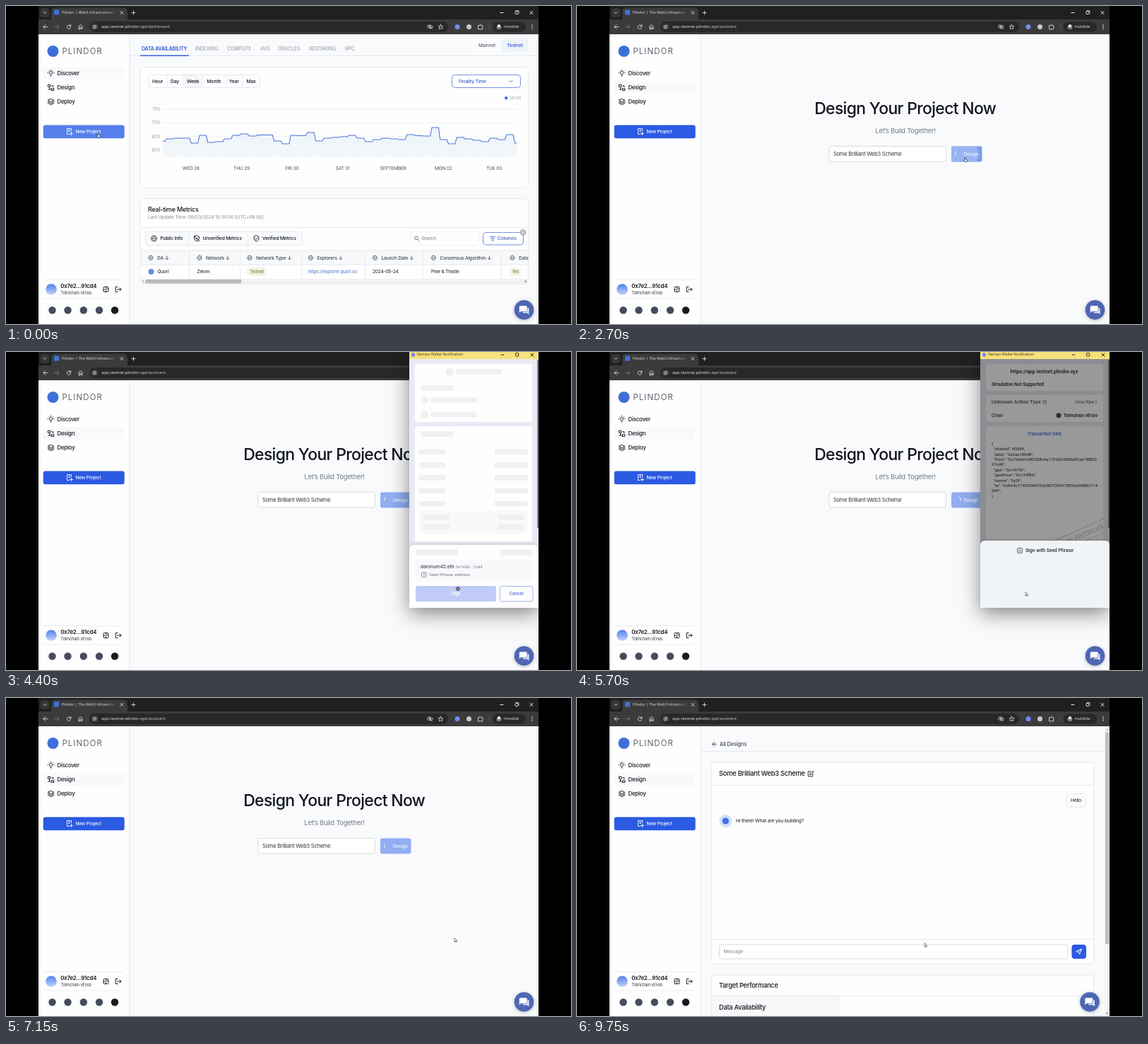
Recreate the animation shown at these times as an HTML page with a canvas. Size 800x450 px, loop 9800 ms.

```html
<!DOCTYPE html>
<html lang="en">
<head>
<meta charset="utf-8">
<title>Project design walkthrough</title>
<style>
html, body { margin: 0; width: 100%; height: 100%; overflow: hidden; background: #000; }
canvas { display: block; width: 800px; height: 450px; }
</style>
</head>
<body>
<canvas id="stage" width="800" height="450"></canvas>
<script>
const c = document.getElementById('stage').getContext('2d');
const LOOP = 9800;
const BLUE = '#2b5ae3', HOVER = '#557fea', INK = '#15181f', GREY = '#777c86', LINE = '#e4e8ee', PAGE = '#f8fafc';
const AT = { assistant: 500, leave: 1130, click: 2550, popup: 2950, loaded: 4700, sign: 5500, created: 5900, closed: 6700, chat: 7250 };
const PROJECT = 'Some Brilliant Web3 Scheme';
const HOST = 'app.testnet.plindor.xyz';

function text(s, x, y, size, color, { w = 400, f = 'Inter', a = 'left', ls } = {}) {
  c.font = `${w} ${size}px "${f}", sans-serif`;
  c.letterSpacing = (ls ?? (f === 'Inter' ? -0.03 * size : 0)) + 'px';
  c.textAlign = a;
  c.textBaseline = 'middle';
  c.fillStyle = color;
  c.fillText(s, x, y);
}
const ui = (s, x, y, size, color, opt) => text(s, x, y, size, color, { f: 'Open Sans', ...opt });
const rob = (s, x, y, size, color, opt) => text(s, x, y, size, color, { f: 'Roboto', ...opt });

function rect(x, y, w, h, fill, r = 0, stroke, lw = 1) {
  c.beginPath();
  c.roundRect(x, y, w, h, r);
  if (fill) { c.fillStyle = fill; c.fill(); }
  if (stroke) { c.strokeStyle = stroke; c.lineWidth = lw; c.stroke(); }
}
function disc(x, y, r, fill, stroke, lw = 1) {
  c.beginPath();
  c.arc(x, y, r, 0, 7);
  if (fill) { c.fillStyle = fill; c.fill(); }
  if (stroke) { c.strokeStyle = stroke; c.lineWidth = lw; c.stroke(); }
}
function icon(d, x, y, color, lw = 1, fill) {
  const p = new Path2D(d);
  c.save();
  c.translate(x, y);
  c.lineCap = c.lineJoin = 'round';
  if (fill) { c.fillStyle = fill; c.fill(p); }
  if (color) { c.strokeStyle = color; c.lineWidth = lw; c.stroke(p); }
  c.restore();
}
const hline = (x1, x2, y, color = LINE) => rect(x1, y, x2 - x1, 1, color);
const vline = (x, y1, y2, color = LINE) => rect(x, y1, 1, y2 - y1, color);
function clip(x, y, w, h, draw) {
  c.save();
  c.beginPath();
  c.rect(x, y, w, h);
  c.clip();
  draw();
  c.restore();
}
function shadowed(color, blur, dy, draw) {
  c.save();
  c.shadowColor = color;
  c.shadowBlur = blur;
  c.shadowOffsetY = dy;
  draw();
  c.restore();
}
const clamp = v => Math.max(0, Math.min(1, v));
function mix(a, b, k) {
  const ch = (s, i) => parseInt(s.slice(i, i + 2), 16);
  return `rgb(${[1, 3, 5].map(i => Math.round(ch(a, i) + (ch(b, i) - ch(a, i)) * k))})`;
}

const CROSS = 'M-2-2L2 2M2-2L-2 2';
const BACK = 'M3 0H-3M0-3L-3 0L0 3';
const DOWN = 'M0-2.5V2.5M-2 .5L0 2.5L2 .5';
const CHEVRON = 'M-2-1L0 1L2-1';
const DOC = 'M3-1V-4H-3V4H0M-1-2H1M-1 0H1M3 1V5M1 3H5';
const SHIELD = 'M0-4L3.5-2.5V0Q3 3 0 4Q-3 3-3.5 0V-2.5ZM-1.5 0L-.3 1.2L1.7-1';

function globe(x, y, r, color) {
  disc(x, y, r, null, color, .7);
  icon(`M${-r} 0H${r}M0 ${-r}Q${-r} 0 0 ${r}Q${r} 0 0 ${-r}`, x, y, color, .6);
}

function chrome(path, title) {
  rect(46, 0, 708, 20, '#1f2020');
  rect(46, 19, 708, 21, '#3b3b3b');
  rect(48.5, 3, 13, 13, '#353636', 4);
  icon(CHEVRON, 55, 9.5, '#ddd', .9);
  rect(64, 2.5, 108, 20, '#3b3b3b', 5);
  rect(68, 5.5, 7, 7, '#3f72d8');
  clip(79, 0, 76, 19, () => ui(title, 79, 9.5, 5.3, '#e2e2e2'));
  const fade = c.createLinearGradient(144, 0, 156, 0);
  fade.addColorStop(0, '#3b3b3b00');
  fade.addColorStop(1, '#3b3b3b');
  rect(144, 4, 12, 12, fade);
  icon(CROSS, 164, 9.5, '#ddd', .9);
  icon('M-2.5 0H2.5M0-2.5V2.5', 180.5, 9.5, '#ddd', .9);
  icon('M-2 0H2', 702, 9.5, '#eee');
  rect(721, 7.5, 4, 4, null, 1, '#eee', .9);
  icon('M-1-2H3V2', 723, 8.5, '#eee', .7);
  icon(CROSS, 744, 9.5, '#eee');

  icon(BACK, 56, 29.5, '#ddd', .9);
  c.save(); c.translate(72, 29.5); c.scale(-1, 1); icon(BACK, 0, 0, '#777', .9); c.restore();
  icon('M2.5-1A2.7 2.7 0 1 0 2.6 1M2.8-3V-.8H.7', 89, 29.5, '#ddd', .9);
  icon('M-2.5 3V-.8L0-3L2.5-.8V3H.8V.7H-.8V3Z', 105.5, 29.5, '#ddd', .9);
  rect(118, 22, 508, 15, '#282828', 7.5);
  disc(125.5, 29.5, 5, '#3c3c3c');
  icon('M-2.6-1.3H-.2M1.8-1.3H2.6M-2.6 1.3H-1.8M.2 1.3H2.6', 125.5, 29.5, '#ddd', .8);
  disc(126.3, 28.2, .9, null, '#ddd', .7);
  disc(124.7, 30.8, .9, null, '#ddd', .7);
  ui(HOST, 135, 29.3, 6, '#eeeeee');
  ui(path, 135 + c.measureText(HOST).width, 29.3, 6, '#cfcfcf');
  icon('M-4 0Q0-5 4 0Q0 5-4 0M-3-3L3 3', 600.5, 29.5, '#ddd', .9);
  disc(600.5, 29.5, 1.2, '#ddd');
  icon('M0-3.4L1-1L3.5-.8L1.6.8L2.2 3.2L0 1.9L-2.2 3.2L-1.6.8L-3.5-.8L-1-1Z', 615.5, 29.5, '#ddd', .8);
  disc(639, 29.5, 3.5, '#6f8df0');
  disc(655.5, 29.5, 3.5, '#c9c9c9');
  icon('M-3-2H-1A1 1 0 1 1 1-2H2.5V0A1 1 0 1 1 2.5 2V3.3H-3Z', 672, 29.5, '#ddd', .9);
  vline(684, 26, 33, '#5b5b5b');
  rect(689, 22.5, 47, 14, '#282828', 7);
  icon('M-3.2 0H3.2M-2-.5L-1.3-3H1.3L2-.5Z', 698, 29.5, '#eee', .7, '#eee');
  disc(696.5, 31.5, 1.1, null, '#eee', .7);
  disc(699.5, 31.5, 1.1, null, '#eee', .7);
  ui('Invisible', 705, 29.5, 5.6, '#f0f0f0');
  for (const y of [27, 29.5, 32]) disc(745, y, .8, '#eee');
}

function sidebar(selected, buttonColor) {
  rect(46, 40, 129, 410, '#fefefe');
  vline(174.5, 40, 450, '#e2e6ec');
  disc(66.5, 64, 8, '#3e6fd9');
  text('PLINDOR', 79.5, 64.5, 11.3, '#303640', { w: 300, ls: 1.2 });
  rect(53, 86 + selected * 20.3, 114, 18, '#f7f9fb', 3);
  ['Discover', 'Design', 'Deploy'].forEach((s, i) => text(s, 72.5, 95.2 + i * 20.3, 7.9, INK, { w: 500 }));
  disc(63.5, 94.5, 2.2, null, INK, .9);
  icon('M-1 4H1M0-4.5V-4M-4.5 0H-4M4 0H4.5M-3-3L-2.7-2.7M3-3L2.7-2.7', 63.5, 94.7, INK, .9);
  icon('M-4-4H-1V-1H-4ZM1 1.5H4V4.2H1ZM-4 3.5L-2 1.5M1-2.5H3V-.5M-.5 2.8H-2.2V0', 63.8, 115.3, INK, 1);
  icon('M0-4L4.2-2L0 0L-4.2-2ZM-4.2 0L0 2.1L4.2 0M-4.2 2L0 4.2L4.2 2', 63.7, 135.5, INK, 1);
  rect(52.7, 168.6, 115, 18.7, buttonColor, 3);
  icon(DOC, 89.5, 177.5, '#fff', .9);
  text('New Project', 98.5, 178.2, 6.6, '#fff', { w: 500 });

  hline(53, 167, 387, '#eaedf1');
  const ball = c.createLinearGradient(0, 393, 0, 409);
  ball.addColorStop(0, '#4f80ec');
  ball.addColorStop(1, '#c3d5fa');
  disc(64, 401, 7.8, ball);
  text('0x7e2...91cd4', 77.3, 396.8, 7.9, INK, { w: 600 });
  text('Tolmchain vErsio', 77.3, 406.3, 5.8, '#353a44');
  icon('M-3.5 1V-2.5Q-3.5-3.5-2.5-3.5H1.5M3.5-1V2.5Q3.5 3.5 2.5 3.5H-1.5', 141.5, 401, INK, .9);
  disc(139.8, 402.8, 1.9, null, INK, .9);
  disc(143.3, 399, 1.7, null, INK, .9);
  icon('M-1-3.5H-3.8V3.5H-1M-1.5 0H4M2-2L4 0L2 2', 159, 401, INK, 1);
  hline(53, 167, 413.5, '#eaedf1');
  for (const x of [65.5, 87.5, 109.8, 132, 154]) disc(x, 430.5, 5.2, x === 154 ? '#191b20' : '#454d5c');
}

function chatButton(x) {
  shadowed('#0004', 5, 1, () => disc(x, 430, 13.8, '#4f66b5'));
  icon('M-2-3H5.5Q7-3 7-1.5V6.5L4.5 4.5H-.5Q-2 4.5-2 3Z', x, 430, null, 1, '#dfe6fb');
  icon('M-7-4.5Q-7-6-5.5-6H3Q4.5-6 4.5-4.5V1Q4.5 2.5 3 2.5H-4.5L-7 4.8Z', x, 430, '#4f66b5', .7, '#fff');
}

// One level per interval of the step chart
const LEVELS = [188, 187, 187, 194, 183, 193, 192, 188, 183, 181, 184, 182.5, 182.5, 191, 195, 183, 183.5, 179, 191, 187,
  186, 185, 183, 187, 192, 189, 187, 188, 189, 182, 183.5, 184, 172, 189, 195, 186, 188, 190, 192, 187, 189, 182, 194];

function chart() {
  rect(190.5, 86.5, 549, 170.5, '#fefefe', 5, LINE);
  rect(201.5, 97.5, 158, 18, '#fcfdfe', 3, LINE);
  rect(251.5, 98, 27.5, 17, '#f4f6f8');
  [228, 251, 279, 311, 335].forEach(x => vline(x, 98, 115, '#edf0f3'));
  [['Hour', 214.5], ['Day', 239], ['Week', 264.7], ['Month', 294.5], ['Year', 322.7], ['Max', 347]]
    .forEach(([s, x]) => text(s, x, 107, 6.8, INK, { w: 500, a: 'center' }));
  rect(631.5, 97.5, 97, 18, '#fff', 4, '#7592dd');
  text('Finality Time', 641, 106.8, 6.8, '#3e63c4', { w: 500 });
  icon(CHEVRON, 715, 106.5, '#3e63c4', 1);
  disc(708.2, 130.2, 2.2, '#3f72e0');
  text('Quorl', 713.5, 130.5, 6.5, '#a3a8b1');
  ['75S', '70S', '65S', '60S'].forEach((s, i) => {
    text(s, 218, 146 + i * 19.4, 6.5, '#9a9ea7', { a: 'right' });
    hline(222, 723, 145.5 + i * 19.4, '#eef0f3');
  });
  const line = new Path2D('M222.5 191.5H225');
  LEVELS.forEach((y, i) => {
    const x = 226 + i * 11.75;
    line.lineTo(x + 1, y);
    line.lineTo(Math.min(x + 10.4, 723), y);
  });
  const area = new Path2D(line);
  area.lineTo(723, 214);
  area.lineTo(222.5, 214);
  const tint = c.createLinearGradient(0, 175, 0, 214);
  tint.addColorStop(0, '#e4eef8b0');
  tint.addColorStop(1, '#f0f5fab0');
  c.fillStyle = tint;
  c.fill(area);
  c.strokeStyle = '#4a78d8';
  c.lineWidth = 1.1;
  c.stroke(line);
  ['WED 28', 'THU 29', 'FRI 30', 'SAT 31', 'SEPTEMBER', 'MON 02', 'TUE 03']
    .forEach((s, i) => text(s, 262 + i * 71.5, 230, 6.6, '#4a4f59', { a: 'center' }));
}

function metrics() {
  rect(190.5, 272.5, 549, 121, '#fefefe', 5, LINE);
  text('Real-time Metrics', 201, 288, 9, INK, { w: 500 });
  text('Last Update Time: 09/03/2024 10:30:00 (UTC+08:00)', 201, 299, 6.8, '#8b909a');
  hline(191, 739, 313);
  rect(197.5, 319.5, 222, 19, '#f8fafb', 3, LINE);
  [258, 342].forEach(x => vline(x, 320, 338));
  globe(209.5, 329, 4, INK);
  icon(SHIELD, 270, 329, INK, .9);
  icon('M-4-4L4 4', 270, 329, INK, 1);
  icon(SHIELD, 354.5, 329, INK, .9);
  [['Public Info', 218.5], ['Unverified Metrics', 278.5], ['Verified Metrics', 363]]
    .forEach(([s, x]) => text(s, x, 329.2, 6.7, INK, { w: 500 }));
  rect(572.5, 319.5, 97, 19, '#fefefe', 3, '#edf0f3');
  disc(581, 328.3, 2.3, null, '#555b66', .8);
  icon('M0 0L2 2', 582.8, 330.2, '#555b66', .8);
  text('Search', 588, 329.2, 6.7, '#777c86');
  rect(675.5, 320.5, 57, 17.5, '#fff', 4, '#7592dd');
  icon('M-3.5-2.5H3.5M-2 0H2M-1 2.5H1', 689, 329.2, '#3e63c4', 1);
  text('Columns', 695.5, 329.2, 6.8, '#3e63c4', { w: 500 });
  disc(732, 320.5, 4.5, '#b5b8be');
  icon(CROSS, 732, 320.5, '#fff', .8);

  rect(191, 345.5, 548, 20, '#f7f9fb');
  hline(191, 739, 345.5);
  hline(191, 739, 365.5);
  [259, 331, 418, 508, 590, 701].forEach(x => vline(x, 346, 386, '#e8ebef'));
  clip(191, 346, 548.5, 47, () => {
    [['DA', 214], ['Network', 283], ['Network Type', 354], ['Explorers', 440.5], ['Launch Date', 531.5], ['Consensus Algorithm', 614.5], ['Data', 726]]
      .forEach(([s, x]) => {
        globe(x - 9, 356.3, 3.2, '#5a606b');
        text(s, x, 356.7, 6.7, '#41464f', { w: 500 });
        icon(DOWN, x + c.measureText(s).width + 5, 356.3, '#41464f', .8);
      });
    disc(205.5, 376, 4, '#5f8fdc');
    text('Quorl', 214.5, 376, 6.6, INK);
    text('Zelvin', 270.5, 376, 6.6, INK);
    rect(341.5, 371, 27.5, 10, '#f1f5df', 5, '#e3e9c8', .6);
    text('Testnet', 355.2, 376.2, 5.9, '#606b3c', { a: 'center' });
    text('https://explorer.quorl.so', 428, 376, 6.5, '#4970cf');
    text('2024-05-24', 519, 376, 6.6, INK);
    text('Pine & Thistle', 602, 376, 6.6, INK);
    rect(714.5, 371, 14, 10, '#f1f5df', 5, '#e3e9c8', .6);
    text('Yes', 721.5, 376.2, 5.9, '#606b3c', { a: 'center' });
  });
  rect(191, 386, 548, 7.5, '#f1f1f2');
  rect(197.5, 387, 135.5, 5.5, '#b9b9bb');
  icon('M1-1.5L-1 0L1 1.5Z', 194, 389.8, null, 1, '#999');
  icon('M-1-1.5L1 0L-1 1.5Z', 736, 389.8, null, 1, '#555');
}

function dashboard() {
  text('DATA AVAILABILITY', 192, 61, 7.05, '#2f5cd2', { w: 600 });
  [['INDEXING', 268], ['COMPUTE', 313], ['AVS', 360], ['ORACLES', 385], ['RESTAKING', 429], ['RPC', 480]]
    .forEach(([s, x]) => text(s, x, 61, 7.1, '#a2a6ae', { w: 500 }));
  hline(175, 754, 70, '#e5e8ed');
  rect(190, 69.5, 69, 1.6, '#3a64d6');
  rect(661, 46, 78.5, 19, '#fbfcfd', 3);
  rect(701.5, 46, 38, 19, '#eef3fa', 3);
  text('Mainnet', 681, 55.5, 6.7, '#4a4f59', { a: 'center' });
  text('Testnet', 720.5, 55.5, 6.7, '#2f5cd2', { w: 500, a: 'center' });
  chart();
  metrics();
}

function designButton(t) {
  const x = 530, y = 198.5;
  if (t < AT.click) {
    rect(x, y, 43.5, 22, mix(BLUE, HOVER, clamp((t - 2150) / 200)), 3);
    text('Design', 551.7, 209.5, 6.7, '#fff', { w: 500, a: 'center' });
    return;
  }
  rect(x, y, 43.5, 22, '#92adf1', 3);
  const age = t - AT.click;
  if (age < 400) clip(x, y, 43.5, 22, () => {
    c.globalAlpha = 1 - age / 400;
    rect(x, y, 43.5, 22, '#6e92ea');
    disc(548, 210, age * .135, '#abc0f5');
  });
  const mid = (.64 * (t - 2700) + 200) * Math.PI / 180;
  c.beginPath();
  c.arc(539.5, 209.5, 4, mid - .8, mid + .8);
  c.strokeStyle = '#fff';
  c.lineWidth = 1;
  c.stroke();
  text('Design', 558.2, 209.5, 6.7, '#f0f4ff', { w: 500, a: 'center' });
}

function assistant(t) {
  text('Design Your Project Now', 464.7, 146, 23, '#12141f', { w: 500, a: 'center' });
  text('Let’s Build Together!', 465, 177, 9.5, GREY, { a: 'center' });
  const focused = t < AT.click;
  rect(357, 198.5, 165.5, 21.5, '#fff', 3, focused ? '#4a78d8' : '#d8dce3', focused ? 1.5 : 1);
  text(PROJECT, 363, 209.5, 7.5, '#30343d');
  designButton(t);
}

function chatPage() {
  icon(BACK, 194.5, 65.3, '#4a4f59', 1);
  text('All Designs', 202, 65.5, 7.6, '#4a4f59', { w: 500 });
  hline(175, 747, 75, '#e5e8ed');
  rect(190.5, 91, 541.5, 285.5, '#fefefe', 4, LINE);
  text(PROJECT, 201, 107, 9.4, INK, { w: 500 });
  const end = 201 + c.measureText(PROJECT).width;
  icon('M0-3H-3.5V4H3V.5M-1 1.5L-.5-.5L3-4L4.5-2.5L1 1Z', end + 8, 107, INK, .9);
  hline(191, 732, 123);
  rect(692.5, 135.5, 28, 19, '#f9fbfc', 3, '#e6eaef');
  text('Hello', 706.5, 145, 6.7, INK, { a: 'center' });
  disc(210.4, 174, 9, '#cfe0fa');
  disc(210.4, 174, 4.6, '#3e6fd9');
  text('Hi there! What are you building?', 225, 174.2, 6.8, INK);
  hline(191, 732, 341);
  rect(201.5, 349, 493, 20, '#fff', 3, '#d8dce3');
  text('Message', 207.5, 359.2, 6.7, '#7f848e');
  rect(700.5, 349, 20.5, 20, BLUE, 4);
  icon('M-3.8-.6L3.8-3.8L.8 3.8L-.6.7ZM-.6.7L3.5-3.5', 710.8, 359, '#fff', .9);
  rect(190.5, 392, 541.5, 70, '#fefefe', 4, LINE);
  text('Target Performance', 201, 407.2, 9.3, INK, { w: 500 });
  hline(191, 732, 421);
  rect(191, 422, 179.5, 28, '#f6f8fa');
  vline(370, 422, 450);
  text('Data Availability', 201, 438, 9.3, INK, { w: 500 });
  rect(747, 40, 7, 410, '#f4f4f5');
  rect(748, 48.5, 5.5, 299.5, '#bfc0c3');
  icon('M-1.5 1L0-1L1.5 1Z', 750.7, 44.5, null, 1, '#888');
  icon('M-1.5-1L0 1L1.5-1Z', 750.7, 446.5, null, 1, '#555');
}

const BONE = '#f0f0f2';
const bar = (x, y, w, h = 7.5) => rect(x, y, w, h, BONE, 2);
const card = (y, h) => rect(579, y, 166, h, '#fefefe', 3);

function skeleton() {
  card(17, 82);
  card(105, 163.5);
  disc(628, 28, 5.5, BONE);
  bar(637, 24, 65);
  bar(587, 47, 46);
  for (const y of [68, 88.5]) {
    disc(592.5, y, 5.5, BONE);
    bar(601.5, y - 3.7, 65);
  }
  bar(587, 112.3, 46);
  for (let i = 0; i < 5; i++) {
    bar(585, 137.5 + i * 18.4, 37);
    bar(692, 137.5 + i * 18.4, 47);
  }
  rect(585, 225, 154, 32, '#f8f9fb', 2);
  for (const y of [230.3, 244]) {
    bar(590, y, 38);
    bar(696, y, 37);
  }
}

const RAW = ['{', '  "chainId": 80084,', '  "data": "0x2ae189d8",', '  "from": "0x7e2b41d90358c6a17Fd204983e5Ca618BD2',
  '91cd4",', '  "gas": "0x14793",', '  "gasPrice": "0x124f8d",', '  "nonce": "0x3f",',
  '  "to": "0x8A4c719D30bFF62e5D7C80415E93a06BB2714', '2e9",', '}'];

function transaction() {
  card(17, 38);
  card(61, 38);
  card(105, 163.5);
  rob('https://' + HOST, 661.5, 28.3, 7.15, '#20242e', { w: 500, a: 'center' });
  rob('Simulation Not Supported', 587, 46.3, 6.4, '#20242e', { w: 500 });
  rob('Unknown Action Type', 587, 70.7, 7.2, '#4e535f', { w: 500 });
  disc(662.3, 71, 2.4, null, '#4e535f', .7);
  rob('?', 662.3, 71.2, 4, '#4e535f', { a: 'center' });
  rob('View Raw', 705, 70.7, 6.3, '#5a6070');
  icon('M-1-2L1 0L-1 2', 735, 70.7, '#5a6070', .8);
  rob('Chain', 587, 89.8, 6.4, '#20242e');
  disc(682, 89.7, 3.5, '#494b52');
  rob('Tolmchain vErsio', 737, 89.8, 6.3, '#20242e', { w: 500, a: 'right' });
  rob('Transaction Data', 662, 115.8, 6.3, '#4669d8', { w: 500, a: 'center' });
  RAW.forEach((s, i) => rob(s, 587, 130 + i * 7.4, 6, '#20242e'));
  c.save();
  c.translate(705, 264);
  c.rotate(-.42);
  rect(-52, -9, 102, 18, null, 2, '#ccced3');
  rob('Custom Network', 0, 0, 12, '#c4c6cc', { a: 'center' });
  c.restore();
}

const drawer = (y, fill) => shadowed('#0003', 6, 0, () => rect(571, y, 183, 362 - y, fill, [6, 6, 0, 0]));

function seedIcon(x, y, color) {
  rect(x - 3.3, y - 3.3, 6.6, 6.6, null, 1, color, .8);
  rob('A', x, y + .2, 5, color, { a: 'center' });
}

function signDrawer(ready) {
  drawer(273, '#fefefe');
  if (!ready) {
    bar(580, 279.5, 60, 8.5);
    bar(700, 279.5, 46, 8.5);
  }
  rect(580, 294, 166, 31, '#f8f9fb', 3);
  rob('daronum42.eth', 587, 303.5, 7, '#2a2e38');
  rob('0x7e2b...1cd4', 637, 304, 6, '#737884');
  seedIcon(591.8, 315.3, '#737884');
  rob('Seed Phrase address', 599, 315.3, 6.2, '#737884');
  rect(580, 331, 114, 22.3, ready ? '#6f87ee' : '#c0cbf7', 3);
  rob('Sign', 637, 342.3, 6.6, '#fff', { w: 500, a: 'center' });
  rect(699.3, 331.5, 46.7, 21.5, '#fff', 3, '#8ca0e8', .8);
  rob('Cancel', 722.8, 342.3, 6.5, '#5f78d8', { w: 500, a: 'center' });
}

function createdDrawer(created) {
  rect(571, 10, 183, 352, 'rgba(0,0,0,.4)');
  drawer(267, '#f0f4f8');
  seedIcon(627, 281, '#2a2e38');
  rob('Sign with Seed Phrase', 635, 281, 6.8, '#2a2e38', { w: 500 });
  if (!created) return;
  shadowed('#8fc0ea', 2, 1, () => {
    disc(620.5, 312.2, 4.6, '#b3b56c');
    rob('Transaction created', 628, 312.5, 9, '#b7bb84', { w: 700 });
  });
  icon('M-2 0L-.5 1.5L2-1.4', 620.5, 312.2, '#fff', 1);
}

function popup(t) {
  shadowed('#0007', 26, 8, () => rect(571, 0, 183, 362, '#e8ebf3'));
  clip(571, 0, 183, 362, () => {
    (t < AT.loaded ? skeleton : transaction)();
    rect(752, 11, 2, 238, '#868a93');
    if (t < AT.sign) signDrawer(t >= AT.loaded);
    else createdDrawer(t >= AT.created);
    rect(571, 0, 183, 10, '#f6e27a');
    disc(576.5, 4, 2.7, '#7084ff');
    ui('Nempo Wallet Notification', 582, 4, 5.3, '#33301f');
    icon('M-2 0H2', 703, 4, '#222');
    rect(721.5, 1.7, 4.2, 4.2, null, .5, '#222', .9);
    icon(CROSS, 745, 4, '#222');
  });
}

// [time, x, y]
const PATH = [[0, 130.5, 180], [900, 130.5, 180], [1150, 176.5, 191.5], [2200, 549.5, 214.5], [3200, 549.5, 214.5],
  [4000, 640, 335], [4700, 640, 335], [5100, 635, 340], [7150, 635, 340], [7450, 492, 347]];

function cursor(t) {
  let i = PATH.findIndex(p => p[0] > t);
  if (i < 0) i = PATH.length;
  const a = PATH[i - 1], b = PATH[i] || a;
  const k = clamp((t - a[0]) / (b[0] - a[0] || 1)), e = k * k * (3 - 2 * k);
  const x = a[1] + (b[1] - a[1]) * e, y = a[2] + (b[2] - a[2]) * e;
  const hand = t < 1000 || (t > 2100 && t < 3250) || (t > AT.loaded && t < AT.sign);
  if (t > 3800 && t < AT.loaded) {
    disc(x, y, 2.5, '#8d9099', '#444851', 1);
    icon('M-1.5 1.5L1.5-1.5', x, y, '#444851', .8);
  } else if (hand) {
    icon('M-.6 0Q.2-.6.6 .3V2L2.4 2.6Q3 3 2.6 4.6L2 6H-.4L-2 3.6Q-1.8 2.8-.6 3.4Z', x, y, '#222', .7, '#fff');
  } else {
    icon('M0 0V5L1.2 4L2 5.8L2.8 5.4L2.1 3.7H3.6Z', x, y, '#333', .6, '#fff');
  }
}

function render(t) {
  rect(0, 0, 800, 450, '#000');
  const onDashboard = t < AT.assistant, onChat = t >= AT.chat;
  clip(46, 0, 708, 450, () => {
    rect(46, 40, 708, 410, PAGE);
    if (onDashboard) dashboard();
    else if (onChat) chatPage();
    else assistant(t);
    sidebar(onDashboard ? 0 : 1, mix(HOVER, BLUE, clamp((t - AT.leave) / 250)));
    chrome(onDashboard ? '/dashboard' : '/assistant',
      onDashboard ? 'Plindor | Web3 Infrastructure As' : 'Plindor | The Web3 Infrastructure');
    chatButton(onChat ? 726 : 733.5);
    if (t >= AT.popup && t < AT.closed) popup(t);
    cursor(t);
  });
}

function frame() {
  render(performance.now() % LOOP);
  requestAnimationFrame(frame);
}
frame();
</script>
</body>
</html>
```
